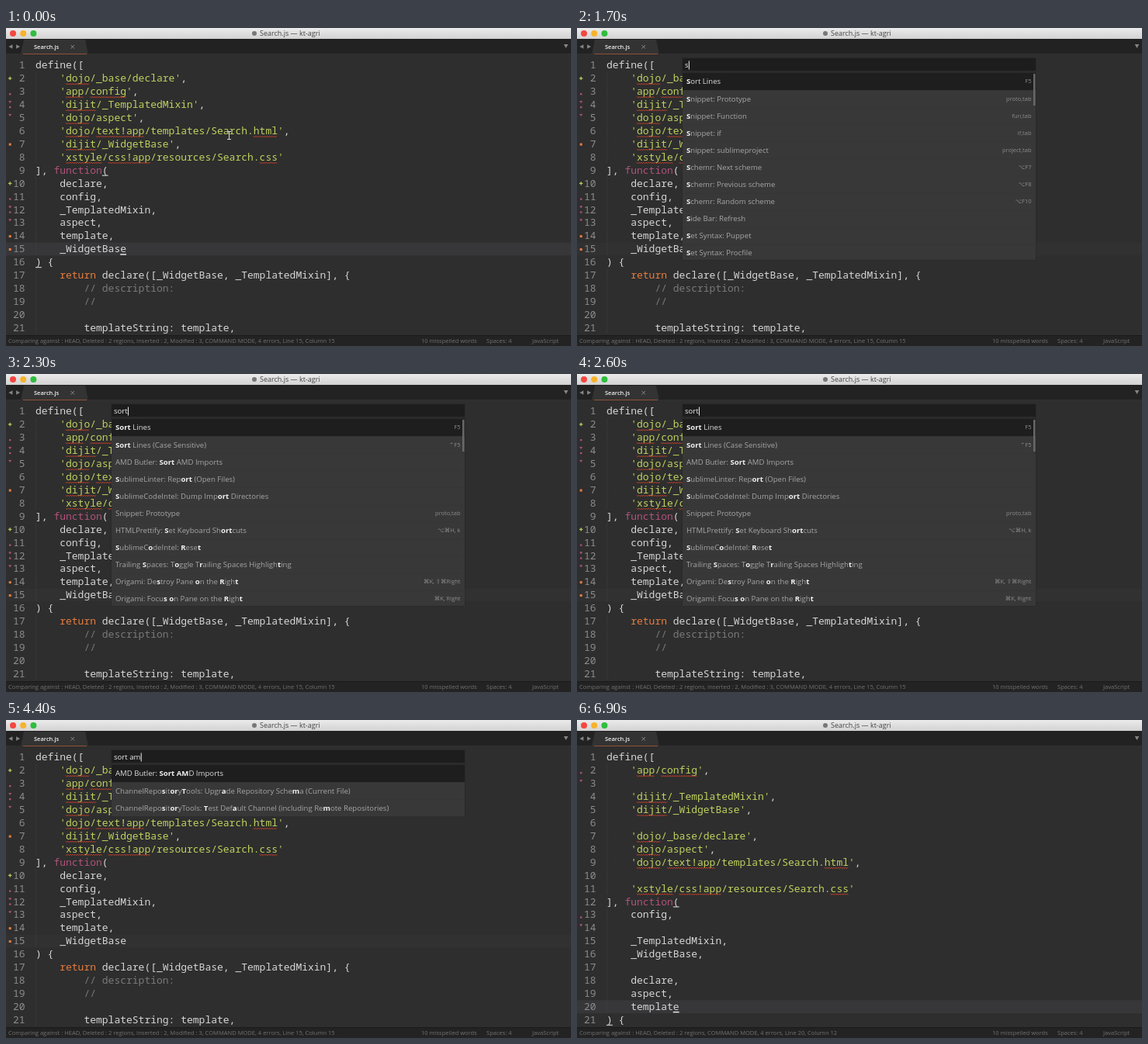
Recreate the animation shown at these times as an HTML page with a canvas. Size 728 by 410 pixels, loop 7 s.

```html
<!DOCTYPE html>
<html lang="en">
<head>
<meta charset="utf-8">
<title>Sorting imports</title>
<style>
html, body { margin: 0; width: 100%; height: 100%; overflow: hidden; background: #2e2e2e; }
canvas { display: block; width: 728px; height: 410px; }
</style>
</head>
<body>
<canvas></canvas>
<script>
const W = 728, H = 410, LOOP = 7000;
const OPEN = 1600, SORTED = 4500;
const CODE = '500 13px "Noto Sans Mono", monospace';
const UI = '"Open Sans", "DejaVu Sans", sans-serif';
const CHAR = 7.8, LINE = 16.93, LEFT = 38;
const FG = '#d6d6d6', PINK = '#b05279', ORANGE = '#e87d3e', GREEN = '#bfd25f', GREY = '#797979';

const before = {
  code: `define([
    'dojo/_base/declare',
    'app/config',
    'dijit/_TemplatedMixin',
    'dojo/aspect',
    'dojo/text!app/templates/Search.html',
    'dijit/_WidgetBase',
    'xstyle/css!app/resources/Search.css'
], function(
    declare,
    config,
    _TemplatedMixin,
    aspect,
    template,
    _WidgetBase
) {
    return declare([_WidgetBase, _TemplatedMixin], {
        // description:
        //

        templateString: template,`.split('\n'),
  added: [2, 10], modified: [7, 14, 15], cutBelow: [3, 4, 11, 12], cutAbove: [4, 5, 12, 13],
  caret: [15, 14], brackets: [[9, 11], [16, 0]],
  status: 'Deleted : 2 regions, Inserted : 2, Modified : 3, COMMAND MODE, 4 errors, Line 15, Column 15'
};
const after = {
  code: `define([
    'app/config',

    'dijit/_TemplatedMixin',
    'dijit/_WidgetBase',

    'dojo/_base/declare',
    'dojo/aspect',
    'dojo/text!app/templates/Search.html',

    'xstyle/css!app/resources/Search.css'
], function(
    config,

    _TemplatedMixin,
    _WidgetBase,

    declare,
    aspect,
    template
) {`.split('\n'),
  added: [], modified: [], cutBelow: [2, 13], cutAbove: [3, 14],
  caret: [20, 11], brackets: [[12, 11], [21, 0]],
  status: 'Deleted : 2 regions, COMMAND MODE, 4 errors, Line 20, Column 12'
};

// Asterisks enclose matched letters; a bar separates the shortcut.
const listS = `*S*ort Lines|F5
*S*nippet: Prototype|proto,tab
*S*nippet: Function|fun,tab
*S*nippet: if|if,tab
*S*nippet: sublimeproject|project,tab
*S*chemr: Next scheme|⌥F7
*S*chemr: Previous scheme|⌥F8
*S*chemr: Random scheme|⌥F10
*S*ide Bar: Refresh
*S*et Syntax: Puppet
*S*et Syntax: Procfile`.split('\n');
const listSort = `*Sort* Lines|F5
*Sort* Lines (Case Sensitive)|⌃F5
AMD Butler: *Sort* AMD Imports
*S*ublimeLinter: Rep*ort* (Open Files)
*S*ublimeCodeIntel: Dump Imp*ort* Directories
Snippet: Prototype|proto,tab
HTMLPrettify: *S*et Keyboard Sh*ort*cuts|⌥⌘H, k
*S*ublimeC*o*deIntel: *R*ese*t*
Trailing *S*paces: T*o*ggle T*r*ailing Spaces Highligh*t*ing
Origami: De*s*troy Pane *o*n the *R*igh*t*|⌘K, ⇧⌘Right
Origami: Focu*s* *o*n Pane on the *R*igh*t*|⌘K, Right`.split('\n');
const listAmd = `AMD Butler: *Sort AM*D Imports
ChannelRepo*s*it*or*y*T*ools: Upgr*a*de Repository Sche*m*a (Current File)
ChannelRepo*s*it*or*yTools: *T*est Def*a*ult Channel (including Re*m*ote Repositories)`.split('\n');

const typing = [
  [OPEN, 's', listS], [1900, 'so', listSort], [2050, 'sor', listSort], [2200, 'sort', listSort],
  [3000, 'sort ', listSort], [3300, 'sort a', listAmd], [3500, 'sort am', listAmd]
];

const canvas = document.querySelector('canvas');
const scale = window.devicePixelRatio || 1;
canvas.width = W * scale;
canvas.height = H * scale;
const ctx = canvas.getContext('2d');
ctx.scale(scale, scale);

const lineY = n => 48 + (n - 1) * LINE;

function rect(x, y, w, h, color) {
  ctx.fillStyle = color;
  ctx.fillRect(x, y, w, h);
}

function text(s, x, y, font, color, align = 'left') {
  ctx.font = font;
  ctx.fillStyle = color;
  ctx.textAlign = align;
  ctx.fillText(s, x, y);
  return ctx.measureText(s).width;
}

function dot(x, y, r, color) {
  ctx.fillStyle = color;
  ctx.beginPath();
  ctx.arc(x, y, r, 0, 7);
  ctx.fill();
}

function triangle(x, y, angle) {
  ctx.save();
  ctx.translate(x, y);
  ctx.rotate(angle);
  ctx.fillStyle = '#858585';
  ctx.beginPath();
  ctx.moveTo(2.6, 0);
  ctx.lineTo(-2.4, -2.8);
  ctx.lineTo(-2.4, 2.8);
  ctx.fill();
  ctx.restore();
}

function stroke(color, width, points) {
  ctx.strokeStyle = color;
  ctx.lineWidth = width;
  ctx.beginPath();
  points.forEach(([x, y]) => ctx.lineTo(x, y));
  ctx.stroke();
}

function squiggle(x, y, w) {
  const points = [];
  for (let d = 0; d <= w; d += 1.5) points.push([x + d, y + (d / 1.5 % 2 ? 0.8 : -0.8)]);
  stroke('#c8402a', 1, points);
}

function codeLine(line, y) {
  const colorOf = s => s[0] === "'" ? GREEN : s.startsWith('//') ? GREY :
    s === 'function' ? PINK : s === 'return' ? ORANGE : FG;
  let x = LEFT;
  for (const part of line.split(/('[^']*'|\/\/.*|function|return)/)) {
    text(part, x, y + 4.3, CODE, colorOf(part));
    if (part[0] === "'")
      for (const m of part.matchAll(/dojo|dijit|config|text!app|css!app|xstyle|html|css|app/g))
        squiggle(x + m.index * CHAR, y + 7.4, m[0].length * CHAR);
    x += part.length * CHAR;
  }
}

function indentGuide(y) {
  for (let d = -8; d < 8; d += 2) rect(LEFT, y + d, 1, 1, '#414141');
}

function underline([line, column], h) {
  rect(LEFT + column * CHAR, lineY(line) + 6.2, CHAR, h, '#e4e4e4');
}

function editor(doc, focused, caretOn) {
  rect(0, 34, W, 362, '#2e2e2e');
  rect(0, lineY(doc.caret[0]) - 8.5, W, LINE, focused ? '#37373a' : '#313132');
  doc.code.forEach((line, i) => {
    const y = lineY(i + 1);
    text(i + 1, 24.6, y + 4.3, CODE, '#8c8c8c', 'right');
    if (!line || line[0] === ' ') indentGuide(y);
    codeLine(line, y);
  });
  doc.added.forEach(n => {
    rect(3, lineY(n) - 0.6, 4.4, 1.2, GREEN);
    rect(4.6, lineY(n) - 2.2, 1.2, 4.4, GREEN);
  });
  doc.modified.forEach(n => rect(3.7, lineY(n) - 1, 3, 3, ORANGE));
  doc.cutBelow.forEach(n => rect(4, lineY(n) + 2.2, 2.4, 2.2, PINK));
  doc.cutAbove.forEach(n => {
    rect(3.5, lineY(n) - 4.8, 3.4, 1.2, PINK);
    rect(4.5, lineY(n) - 4.8, 1.4, 2.6, PINK);
  });
  if (focused) {
    doc.brackets.forEach(b => underline(b, 1));
    if (caretOn) underline(doc.caret, 1.5);
  }
}

function chrome(doc) {
  const bar = ctx.createLinearGradient(0, 0, 0, 14);
  bar.addColorStop(0, '#ebebeb');
  bar.addColorStop(1, '#d2d2d2');
  rect(0, 0, W, 14, bar);
  ['#f4473f', '#f7b32c', '#2fbe3f'].forEach((c, i) => dot(9 + i * 13.2, 7, 4, c));
  dot(320, 7, 3, '#777');
  text('Search.js — kt-agri', 327, 10.4, '9px ' + UI, '#444');

  rect(0, 14, W, 20, '#222');
  ctx.fillStyle = '#333';
  ctx.beginPath();
  [[19, 34], [23, 15], [102, 15], [106, 34]].forEach(p => ctx.lineTo(...p));
  ctx.fill();
  rect(0, 33, W, 1, '#303030');
  rect(22, 33, 82, 1, '#8f5236');
  triangle(6, 24, Math.PI);
  triangle(15.5, 24, 0);
  triangle(721.5, 23.5, Math.PI / 2);
  text('Search.js', 36, 26.8, '600 7.5px ' + UI, '#f0f0f0');
  stroke('#858585', 1, [[83.5, 22], [88, 26.5]]);
  stroke('#858585', 1, [[88, 22], [83.5, 26.5]]);

  rect(0, 396, W, 14, '#232323');
  rect(0, 396, W, 1, '#1b1b1b');
  const small = '7.55px ' + UI, dim = '#727272';
  text('Comparing against : HEAD, ' + doc.status, 3, 406, small, dim);
  text('10 misspelled words', 535, 406, small, dim);
  text('Spaces: 4', 619, 406, small, dim);
  text('JavaScript', 678, 406, small, dim);
}

function palette(query, list) {
  const x = 136, top = 58, row = 22.1, w = 455;
  const h = Math.min(list.length * row, 241);
  ctx.save();
  ctx.shadowColor = '#0004';
  ctx.shadowBlur = 2 * scale;
  rect(x, 39, w, top + h - 39, '#383838');
  ctx.restore();
  rect(x, 39, w, 19, '#2b2b2b');
  rect(x, 39, w, 16, '#1d1d1d');
  rect(x, top, w, row, '#1e1e1e');
  const end = 139 + text(query, 139, 51.2, '500 9.6px ' + UI, '#ececec');
  rect(end + 0.3, 42.5, 1, 11, '#eee');
  list.forEach((item, i) => {
    const [label, keys] = item.split('|'), y = top + i * row;
    let tx = 141;
    label.split('*').forEach((part, k) => {
      const bold = k % 2;
      tx += text(part, tx, y + 14.4, (bold ? '700' : '500') + ' 9.6px ' + UI,
        bold ? '#f0f0f0' : i ? '#a6a6a6' : '#dedede');
    });
    if (keys) text(keys, 585.5, y + 13.4, '7.5px ' + UI, '#8c8c8c', 'right');
    if (i) rect(x, y, w, 0.6, '#343434');
  });
  if (list.length > 3) rect(588, 59, 2.5, 41, '#686868');
}

function pointer(x, y) {
  stroke('#d8d8d8', 1, [[x, y - 5], [x, y + 5]]);
  stroke('#d8d8d8', 1, [[x - 2.5, y - 5], [x + 2.5, y - 5]]);
  stroke('#d8d8d8', 1, [[x - 2.5, y + 5], [x + 2.5, y + 5]]);
}

function draw(t) {
  const sorted = t >= SORTED, searching = t >= OPEN && !sorted;
  const doc = sorted ? after : before;
  const caretOn = Math.floor((t - (sorted ? SORTED : 0)) / 500) % 2 === 0;
  editor(doc, !searching, caretOn);
  chrome(doc);
  if (searching) {
    const [, query, list] = typing.filter(([start]) => t >= start).pop();
    palette(query, list);
  } else if (!sorted) pointer(287.5, 138.5);
}

const start = performance.now();
(function tick() {
  draw((performance.now() - start) % LOOP);
  requestAnimationFrame(tick);
})();
</script>
</body>
</html>
```
